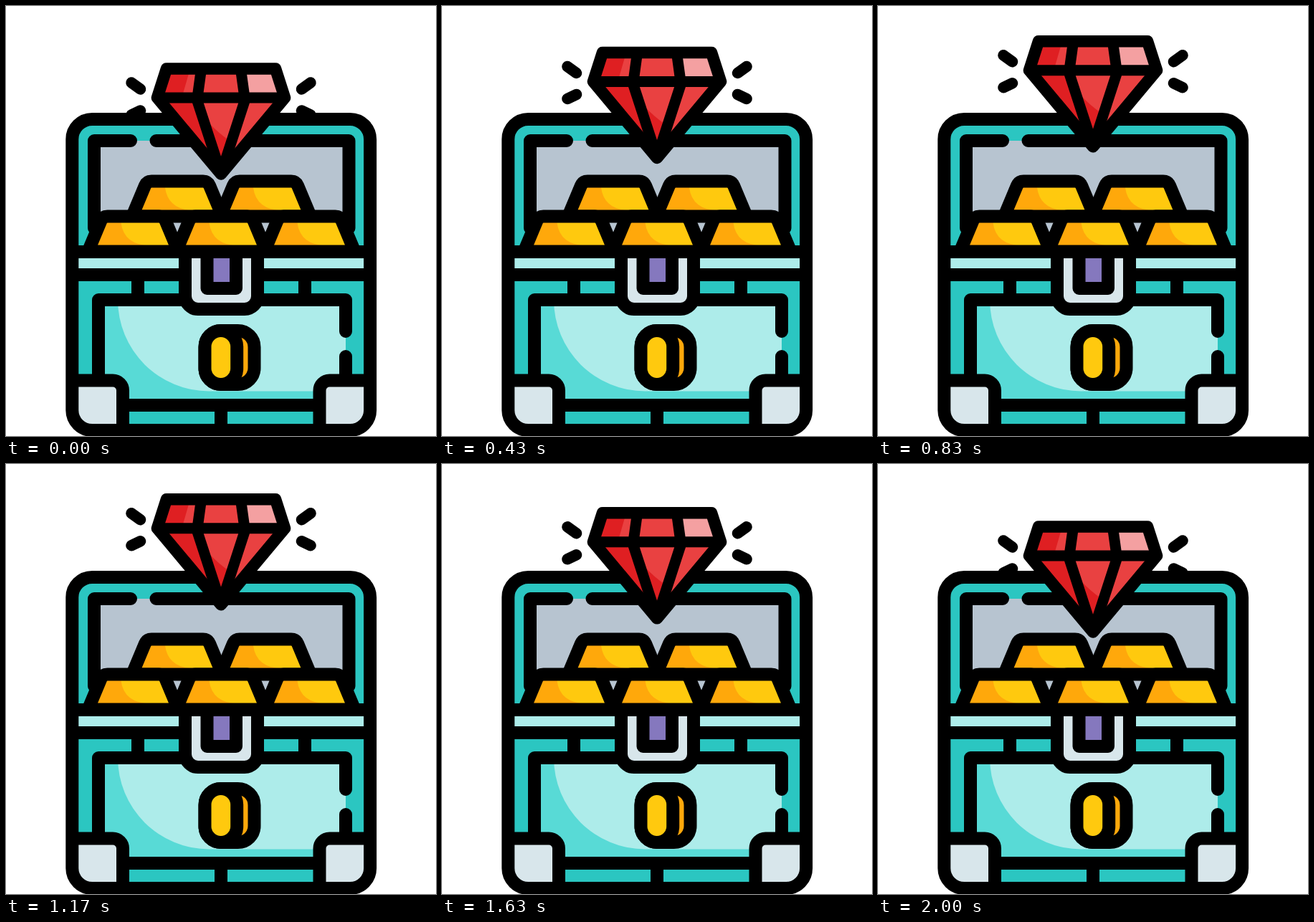
Animation of 600x600 px, one loop 2030 ms. Source, as an HTML page:

```html
<!DOCTYPE html>
<html lang="en">
<head>
<meta charset="utf-8">
<title>Treasure chest</title>
<style>
  html, body { margin: 0; width: 100%; height: 100%; overflow: hidden; background: #fff; }
  svg { display: block; width: 100vw; height: 100vh; }
  .line { fill: none; stroke: #000; stroke-width: 18; stroke-linecap: round; stroke-linejoin: round; }
  .butt { stroke-linecap: butt; }
</style>
</head>
<body>
<svg viewBox="0 0 600 600">
  <defs>
    <g id="bar">
      <path fill="#ffc90e" d="M-42.5 0H42.5L63 49H-63Z"/>
      <path fill="#ffa80b" d="M-42.5 0H-17V9Q-13 40 24 41V49H-63Z"/>
      <path class="line" d="M-63 49L-45 6Q-42.5 0 -36 0H36Q42.5 0 45 6L63 49Z"/>
    </g>
    <g id="bracket">
      <path fill="#d8e6eb" d="M92 522H149A14 14 0 0 1 163 536V592H120A28 28 0 0 1 92 564Z"/>
      <path class="line butt" d="M92 522.5H149A14 14 0 0 1 163 536.5V592"/>
    </g>
    <path id="sparks" class="line" style="stroke-width:15.5" d="M175 107L187.5 116M187.5 146L175 152"/>
  </defs>

  <g class="rise">
    <use href="#sparks"/>
    <use href="#sparks" transform="matrix(-1 0 0 1 600 0)"/>
  </g>

  <g id="chest">
    <rect x="92.3" y="158" width="415.8" height="434" rx="28" fill="#2bc6c1"/>
    <path fill="#b7c4d0" d="M123 188H478V343H123Z"/>
    <path class="line" d="M123 310V188H174M209.5 188H478.5V310"/>
    <use href="#bar" x="239" y="244.5"/>
    <use href="#bar" x="362" y="244.5"/>
    <use href="#bar" x="177.5" y="293.5"/>
    <use href="#bar" x="300.5" y="293.5"/>
    <use href="#bar" x="423.5" y="293.5"/>

    <path fill="#adecea" d="M92 343H508V375H92Z"/>
    <path fill="#58dad6" d="M129 410H474V557H129Z"/>
    <path fill="#adecea" d="M156 410H474V537.5H283.5A127.5 127.5 0 0 1 156 410Z"/>
    <path class="line butt" d="M92 343H508M92 375H508M184 375V410M417 375V410M163 557H437M300 557V592"/>
    <path class="line" d="M129 520V410H474V454M474 489V520"/>
    <use href="#bracket"/>
    <use href="#bracket" transform="matrix(-1 0 0 1 600.5 0)"/>

    <path fill="#d8e6eb" stroke="#000" stroke-width="18" d="M250 343V405A18 18 0 0 0 268 423H333A18 18 0 0 0 351 405V343Z"/>
    <path fill="#8578be" stroke="#000" stroke-width="18" stroke-linejoin="round" d="M280.5 343H321V394H280.5Z"/>
    <rect x="277.5" y="453" width="69" height="75" rx="23" fill="#ffa80b" stroke="#000" stroke-width="18"/>
    <rect x="277.5" y="453" width="44.7" height="75" rx="22.3" fill="#ffc90e" stroke="#000" stroke-width="18"/>
    <rect class="line" x="92.3" y="158" width="415.8" height="434" rx="28"/>
  </g>

  <g class="rise">
    <path fill="#e94141" d="M224 87.5H376L389 128L300 234.5L211 128Z"/>
    <path fill="#df1f22" d="M224 87.5H257L247 122L262 134Q279 165 312 188L300 234.5L211 128Z"/>
    <path fill="#f4a0a1" d="M329 87.5H376L389 128H333Z"/>
    <path class="line butt" style="stroke-width:15" d="M211 128H389M272.5 88L267 128M265.5 128L300 234L334.5 128M333 128L327.5 88"/>
    <path class="line" style="stroke-width:16.6" d="M224 87.5H376L389 128L300 234.5L211 128Z"/>
  </g>
</svg>
<script>
  const LOOP = 2030, HALF = 30, HEIGHT = 40.5;
  const rising = document.querySelectorAll(".rise");

  const bezier = (a, b, s) => 3 * (1 - s) ** 2 * s * a + 3 * (1 - s) * s * s * b + s ** 3;

  // Steady start, soft stop.
  function ease(x) {
    let low = 0, high = 1;
    for (let i = 0; i < 24; i++) {
      const mid = (low + high) / 2;
      if (bezier(0.167, 0.667, mid) < x) low = mid; else high = mid;
    }
    return bezier(0.167, 1, low);
  }

  function draw(ms) {
    // The motion advances in thirtieths of a second.
    const step = Math.floor((ms % LOOP + 5) * 0.03);
    const progress = Math.max(0, 1 - Math.abs(step - HALF) / HALF);
    const y = -HEIGHT * ease(progress);
    for (const part of rising) part.setAttribute("transform", `translate(0 ${y.toFixed(2)})`);
  }

  const start = performance.now();
  function tick() {
    draw(performance.now() - start);
    requestAnimationFrame(tick);
  }
  tick();
</script>
</body>
</html>
```
